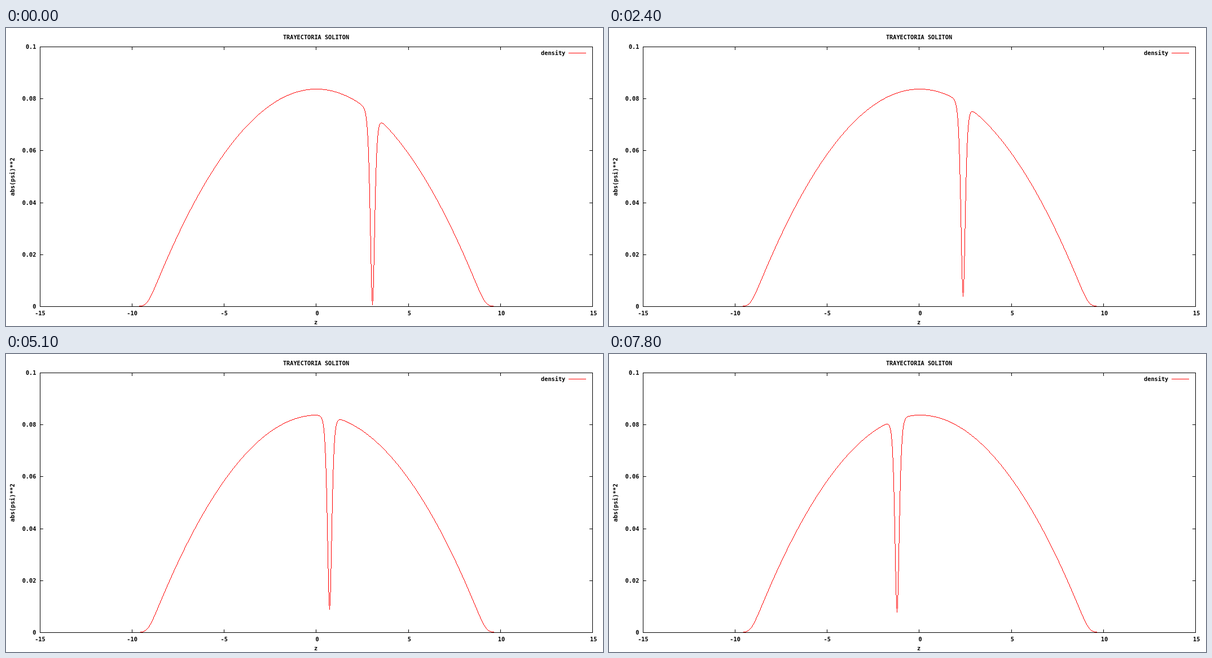
These frames come from a looping animation (1058x529 px, 8 s). An HTML page:

```html
<!DOCTYPE html>
<html lang="es">
<head>
<meta charset="utf-8">
<title>Trayectoria soliton</title>
<style>
  html, body { margin: 0; width: 100%; height: 100%; overflow: hidden; background: #fff; }
  svg { display: block; width: 100%; height: 100%; }
  path { fill: none; stroke: #000; stroke-width: 1; shape-rendering: crispEdges; }
  .red { stroke: #f00; }
  text { font: bold 10.25px "DejaVu Sans Mono", "Liberation Mono", monospace; text-anchor: middle; }
  .end { text-anchor: end; }
</style>
</head>
<body>
<svg viewBox="0 0 1058 529">
  <path id="curve" class="red"/>
  <path class="red" d="M997 44.5H1028"/>
  <path id="axes"/>
  <g id="labels">
    <text x="549.5" y="20">TRAYECTORIA SOLITON</text>
    <text class="end" x="991.3" y="48">density</text>
    <text x="549.2" y="526">z</text>
    <text transform="translate(15 264) rotate(-90)">abs(psi)**2</text>
  </g>
</svg>
<script>
const LOOP = 8000, STEP = 300;
const LEFT = 60, RIGHT = 1039, TOP = 33, BOTTOM = 494;
const CENTER = (LEFT + RIGHT) / 2, UNIT = (RIGHT - LEFT) / 30;
const PEAK = 386, RADIUS = 9.17, EDGE = 0.031, DIP_WIDTH = 5.1;

// Dip trajectory: time in ms, x and y of its lowest point.
const TRACK = [
  [0, 649, 491], [1200, 642, 486], [2400, 627, 476], [3600, 605, 463],
  [5100, 573, 453], [6300, 545, 448], [7800, 510, 458]
];

const byId = id => document.getElementById(id);

function slope(i, k) {
  const a = TRACK[Math.max(i - 1, 0)], b = TRACK[Math.min(i + 1, TRACK.length - 1)];
  return i === 0 ? 0 : (b[k] - a[k]) / (b[0] - a[0]);
}

// Cubic Hermite interpolation of column k.
function track(t, k) {
  let i = 0;
  while (i < TRACK.length - 2 && t >= TRACK[i + 1][0]) i++;
  const a = TRACK[i], b = TRACK[i + 1], span = b[0] - a[0];
  const u = (t - a[0]) / span, v = 1 - u;
  return a[k] * (1 + 2 * u) * v * v + b[k] * u * u * (3 - 2 * u)
    + span * u * v * (slope(i, k) * v - slope(i + 1, k) * u);
}

// Recoil of the cloud: the dip oscillates sqrt(2) times slower than the whole.
function drift(t) {
  const phase = 0.095 + 0.000243 * t;
  return 2.25 * (Math.cos(phase) - Math.cos(Math.SQRT2 * phase));
}

// Inverted parabola with softened edges, in pixels above the axis.
function cloud(dx) {
  const p = 1 - (dx / UNIT / RADIUS) ** 2;
  return PEAK * EDGE * Math.log1p(Math.exp(p / EDGE));
}

function draw(t) {
  const dipX = Math.round(track(t, 1));
  const floor = BOTTOM - track(t, 2);
  const middle = CENTER + drift(t);
  const rowAt = x => {
    const height = cloud(x - middle);
    const rest = 1 - Math.tanh((x - dipX) / DIP_WIDTH) ** 2;
    return Math.round(BOTTOM - height + (height - floor) * rest);
  };
  // One vertical run per column keeps the line a single pixel wide.
  let d = "";
  for (let x = LEFT; x <= RIGHT; x++) {
    const y = rowAt(x);
    const before = Math.round((rowAt(x - 1) + y) / 2);
    const after = Math.round((y + rowAt(x + 1)) / 2);
    const top = Math.min(y, before, after);
    const bottom = Math.max(y + 1, before, after);
    d += `M${x + 0.5} ${top}V${bottom}`;
  }
  byId("curve").setAttribute("d", d);
}

function addLabel(text, x, y, cls = "") {
  const el = document.createElementNS("http://www.w3.org/2000/svg", "text");
  el.setAttribute("x", x);
  el.setAttribute("y", y);
  el.setAttribute("class", cls);
  el.textContent = text;
  byId("labels").append(el);
}

function buildAxes() {
  let d = `M${LEFT + 0.5} ${TOP + 0.5}H${RIGHT + 0.5}V${BOTTOM + 0.5}H${LEFT + 0.5}Z`;
  for (let z = -15; z <= 15; z += 5) {
    const x = CENTER + z * UNIT;
    const column = Math.round(x - 0.01) + 0.5;
    if (Math.abs(z) < 15) d += `M${column} ${TOP}v6M${column} ${BOTTOM + 1}v-6`;
    addLabel(z, x + (z < 0 ? 0.4 : 2.2), 509.5);
  }
  for (let i = 0; i <= 5; i++) {
    const y = Math.round(BOTTOM - i * (BOTTOM - TOP) / 5);
    if (i % 5) d += `M${LEFT} ${y + 0.5}h6M${RIGHT + 1} ${y + 0.5}h-6`;
    addLabel(i * 2 / 100, 53.4, y + 4, "end");
  }
  byId("axes").setAttribute("d", d);
}

const start = performance.now();
let shown = -1;

function tick() {
  const step = Math.floor(((performance.now() - start) % LOOP) / STEP);
  if (step !== shown) draw((shown = step) * STEP);
  requestAnimationFrame(tick);
}

buildAxes();
tick();
</script>
</body>
</html>
```
